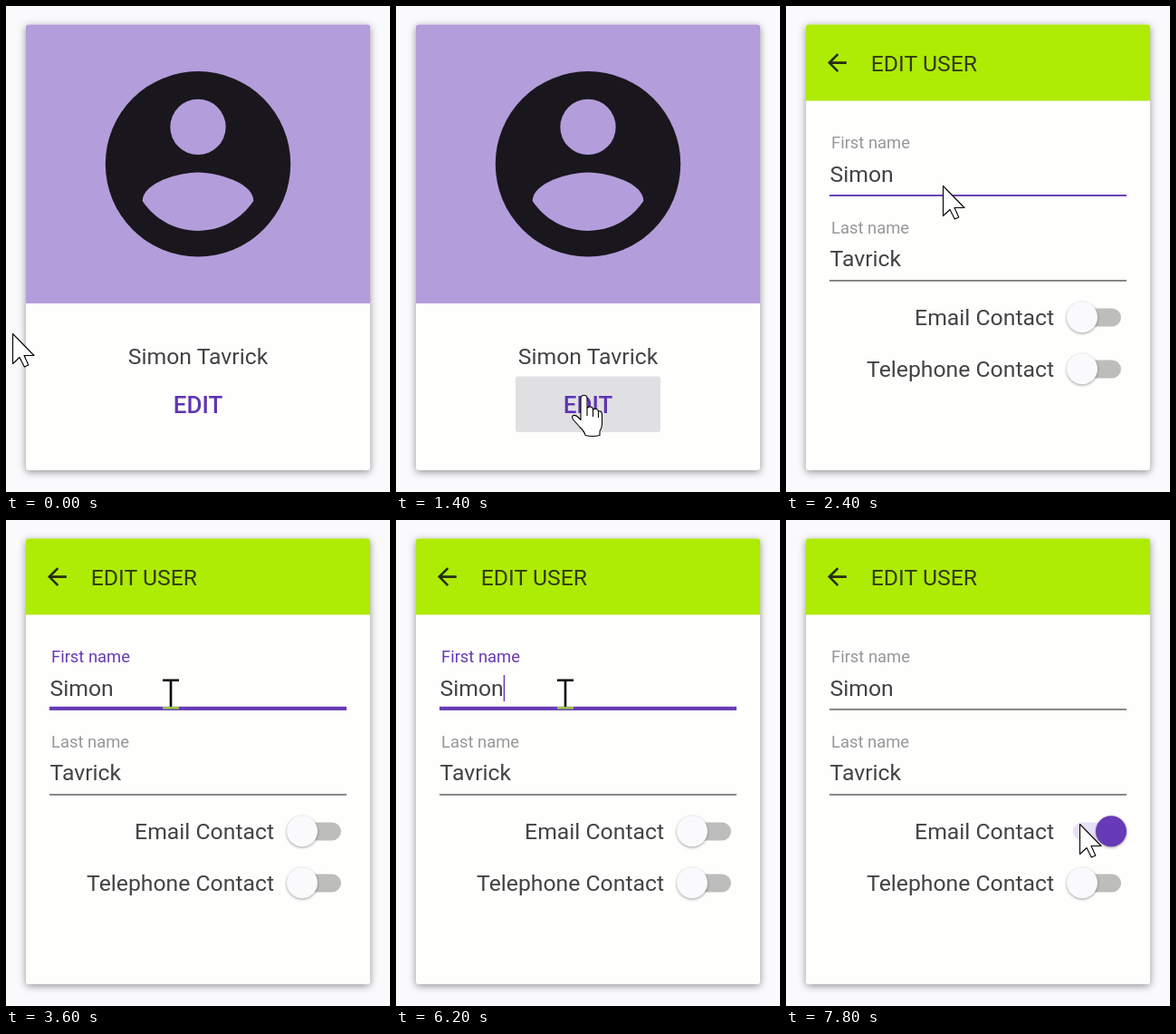
An HTML page for the animation above (8 s loop, 424x536 px).

```html
<!DOCTYPE html>
<html lang="en">
<head>
<meta charset="utf-8">
<title>Edit user card</title>
<style>
  html, body { margin: 0; width: 100%; height: 100%; overflow: hidden; background: #fafafc; }
  svg { display: block; width: 100vw; height: 100vh; }
  text { font-family: Roboto, sans-serif; font-size: 24.75px; fill: #434343; }
  .small { font-size: 18.4px; fill: #979797; }
  .shade { filter: drop-shadow(0 2px 4px rgba(0, 0, 0, .42)); }
  .thumb { filter: drop-shadow(0 1.5px 1.5px rgba(0, 0, 0, .38)); }
  .pointer { fill: #fff; stroke: #000; stroke-width: 1.1; stroke-linejoin: round; }
  #ibeam { fill: #fff; mix-blend-mode: difference; }
</style>
</head>
<body>
<svg viewBox="0 0 424 536">
  <rect width="424" height="536" fill="#fafafc"/>

  <rect id="card" class="shade" x="22" y="20.500" width="380" height="491.500" rx="3" fill="#fefefd"/>

  <g id="front">
    <path d="M22 328V23.500a3 3 0 0 1 3-3H399a3 3 0 0 1 3 3V328z" fill="#b49ddb"/>
    <g transform="translate(212 174.3) scale(10.22) translate(-12 -12)">
      <circle cx="12" cy="12" r="10" fill="#19171d"/>
      <circle cx="12" cy="8" r="3" fill="#b49ddb"/>
      <path d="M12 19.2c-2.5 0-4.71-1.28-6-3.22.03-1.99 4-3.08 6-3.08 1.99 0 5.97 1.09 6 3.08-1.29 1.94-3.5 3.22-6 3.22z" fill="#b49ddb"/>
    </g>
    <text id="fullName" x="212" y="394.5" text-anchor="middle"></text>
    <rect id="button" x="132" y="408.5" width="160" height="61.5" rx="3" fill="#e0e0e3"/>
    <text x="212" y="448.5" text-anchor="middle" style="font-size:26px;font-weight:500;fill:#5e35b1">EDIT</text>
  </g>

  <g id="back">
    <path d="M22 104.500V23.500a3 3 0 0 1 3-3H399a3 3 0 0 1 3 3V104.500z" fill="#aeeb05"/>
    <path d="M20 11H7.83l5.59-5.59L12 4l-8 8 8 8 1.41-1.41L7.83 13H20v-2z" fill="#252d10"
          transform="translate(56.4 62.6) scale(1.3) translate(-12 -12)"/>
    <text x="93.8" y="71.5" style="fill:#323b14">EDIT USER</text>

    <text id="label" class="small">First name</text>
    <text id="first" x="48.5" y="194.2"></text>
    <rect id="caret" y="171" width="1.5" height="29" fill="#673ab7"/>
    <rect x="48" y="208" width="328" height="1.8" fill="#7c7c7c"/>
    <rect id="line" fill="#673ab7"/>

    <text class="small" x="50" y="251">Last name</text>
    <text id="last" x="48.5" y="287.2"></text>
    <rect x="48" y="302" width="328" height="1.8" fill="#7c7c7c"/>

    <text x="296" y="352" text-anchor="end">Email Contact</text>
    <rect id="track" x="317" y="333.5" width="53" height="20" rx="10"/>
    <circle id="thumb" class="thumb" cy="343.3" r="17"/>

    <text x="296" y="409" text-anchor="end">Telephone Contact</text>
    <rect x="317" y="390.5" width="53" height="20" rx="10" fill="#bdbdbb"/>
    <circle class="thumb" cx="327" cy="400.3" r="17" fill="#fafafd"/>
  </g>

  <polygon id="edge" fill="#000"/>

  <path id="arrow" class="pointer" d="M.5 .5V33.5L8 26.5L13.3 37L17.8 35L13 24.5H24z"/>
  <path id="hand" class="pointer" d="M-3 2.5Q-2.5-.8 .5-.8Q4-.8 4 3V14Q5 11.5 8 12Q10.500 12.500 10.500 15.500Q12 13.500 14.500 14.500Q16.500 15.500 16.500 17.500Q18 16 19.500 17.500Q20.500 18.500 20.500 21V31Q20.500 35 18 39V43.500Q10 45.500 2 43.500Q1 39-4 34.500L-11.500 26Q-13.500 22.500-11 21.500Q-8.500 21-6 23.500L-3 26.500zM4 14V22M10.500 15.500V23M16.500 17.500V24"/>
  <path id="ibeam" d="M-9-16.500H9V-14H1.300V14H9V16.500H-9V14H-1.300V-14H-9z"/>
</svg>

<script>
const LOOP = 8000, TICK = 200;
const FIRST = 'Simon', LAST = 'Tavrick';
const PURPLE = [103, 58, 183], GREY = [151, 151, 151];

const el = {};
document.querySelectorAll('[id]').forEach(n => el[n.id] = n);

const set = (node, attrs) => { for (const k in attrs) node.setAttribute(k, attrs[k]); };
const show = (node, on) => set(node, { visibility: on ? 'visible' : 'hidden' });
const clamp = v => Math.min(1, Math.max(0, v));
const ramp = (t, a, b) => clamp((t - a) / (b - a));
const ease = p => p * p * (3 - 2 * p);
const mix = (a, b, p) => a + (b - a) * p;
const blend = (a, b, p) => `rgb(${a.map((v, i) => Math.round(mix(v, b[i], p)))})`;

// Pointer stops: time, x, y
const stops = [
  [0, 7, 361], [600, 7, 361], [1200, 207, 430], [1800, 207, 430],
  [2400, 173, 198], [3000, 182, 192], [6000, 182, 192], [6200, 187, 192],
  [6900, 338, 371], [7200, 330, 349], [7600, 324, 335], [LOOP, 324, 335]
];

function pointerAt(t) {
  const i = Math.max(1, stops.findIndex(s => s[0] > t));
  const [a, b] = [stops[i - 1], stops[i]];
  const p = ease(ramp(t, a[0], b[0]));
  return [mix(a[1], b[1], p), mix(a[2], b[2], p)];
}

function drawPointer(t) {
  const [x, y] = pointerAt(t);
  const onButton = t < 1500 && x > 132 && x < 292 && y > 408 && y < 470;
  const onField = t >= 2500 && t < 6700;
  const shape = onButton ? el.hand : onField ? el.ibeam : el.arrow;
  for (const node of [el.arrow, el.hand, el.ibeam]) show(node, node === shape);
  set(shape, { transform: `translate(${x} ${y})` });
  show(el.button, onButton);
}

// Card turned about its vertical axis, seen in perspective
function drawFlip(t) {
  const turn = Math.PI * ramp(t, 1403.5, 1803.5);
  const flipping = t > 1400 && t < 1800;
  const halfW = 190, halfH = 246, depth = 497;
  const corner = (sx, sy) => {
    const k = depth / (depth + sx * halfW * Math.sin(turn));
    return `${212.5 + sx * halfW * Math.cos(turn) * k},${266.5 + sy * halfH * k}`;
  };
  set(el.edge, { points: [corner(-1, -1), corner(1, -1), corner(1, 1), corner(-1, 1)].join(' ') });
  show(el.edge, flipping);
  show(el.card, !flipping);
  el.front.style.display = t <= 1400 ? '' : 'none';
  el.back.style.display = t >= 1800 ? '' : 'none';
}

function drawField(t) {
  const erased = Math.floor(ramp(t, 3800, 4400) * 5 + .5);
  const typed = t < 5000 ? 0 : Math.min(5, 1 + Math.floor((t - 5000) / 200));
  const count = t < 4000 ? 5 : Math.max(5 - erased, typed);
  el.first.textContent = FIRST.slice(0, count);

  const focus = ramp(t, 3100, 3350) * (1 - ramp(t, 7300, 7500));
  const float = 1 - ease(ramp(t, 4300, 4600)) + ease(ramp(t, 4900, 5150));
  set(el.label, { x: mix(48.5, 50, float), y: mix(194.2, 157, float) });
  el.label.style.fontSize = mix(24.75, 18.4, float) + 'px';
  el.label.style.fill = blend(GREY, PURPLE, focus * float);

  const hover = t >= 2400 && t < 3400;
  const width = 328 * (hover ? 1 : focus);
  const height = focus > 0 ? 4 : 1.8;
  set(el.line, { x: 212 - width / 2, y: 209.8 - height, width, height });

  const caretOn = (t >= 3200 && t < 3600) || (t >= 4000 && t < 4600) || (t >= 5000 && t < 7300);
  el.caret.style.display = caretOn ? '' : 'none';
  set(el.caret, { x: 48.5 + (count ? el.first.getComputedTextLength() : 0) });
}

function drawSwitch(t) {
  const on = ease(ramp(t, 7350, 7700));
  set(el.thumb, { cx: mix(327, 359, on), fill: blend([250, 250, 253], PURPLE, on) });
  set(el.track, { fill: blend([189, 189, 187], [231, 224, 247], on) });
}

function draw(t) {
  drawFlip(t);
  drawField(t);
  drawSwitch(t);
  drawPointer(t);
}

function frame() {
  const t = performance.now() % LOOP;
  draw(Math.floor(t / TICK) * TICK);
  requestAnimationFrame(frame);
}

el.fullName.textContent = `${FIRST} ${LAST}`;
el.last.textContent = LAST;
frame();
</script>
</body>
</html>
```
